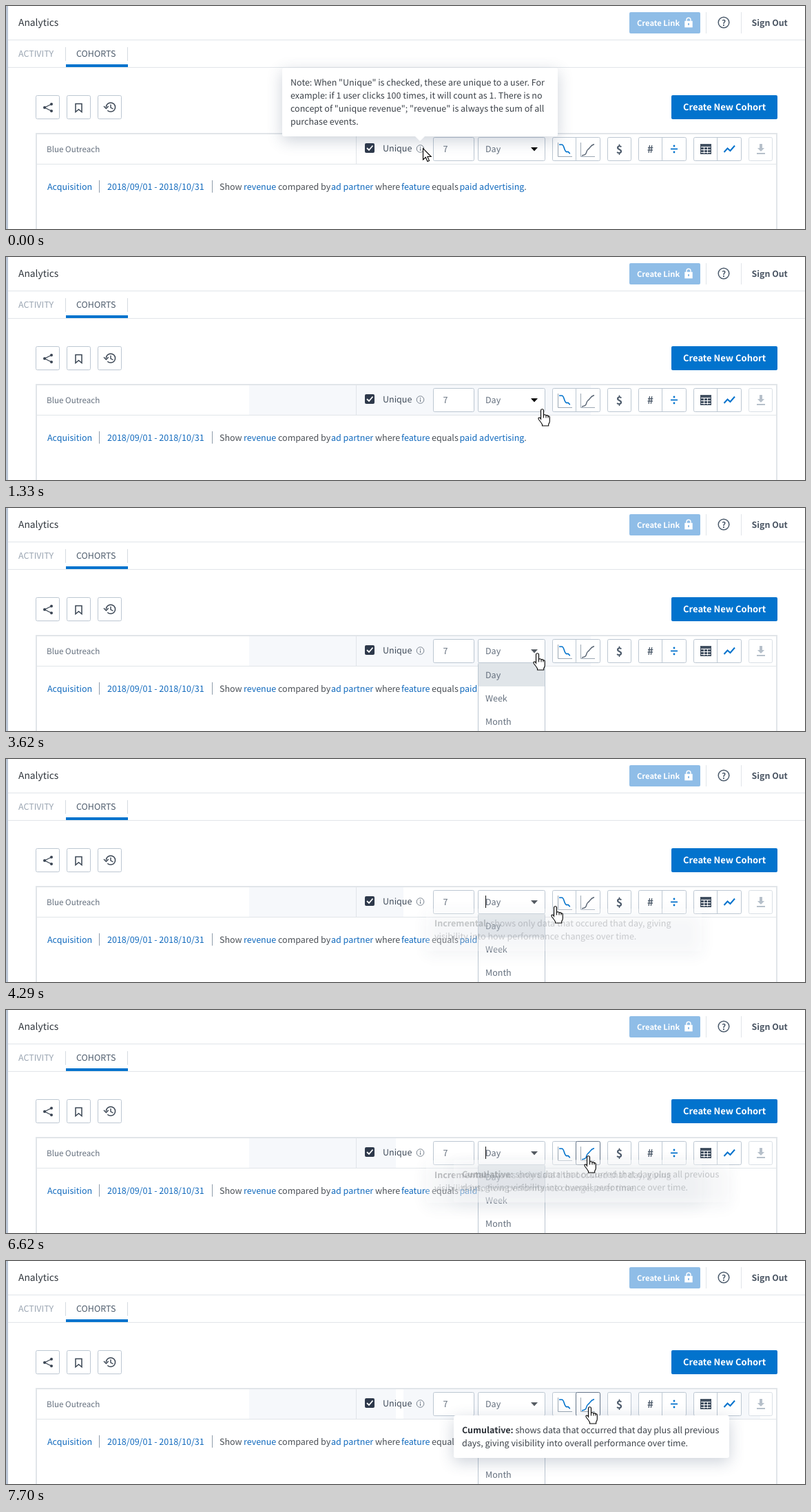
An HTML page with a canvas that plays this animation: 1160x325 px, repeating every 8 s.

```html
<!DOCTYPE html>
<html lang="en">
<head>
<meta charset="utf-8">
<title>Cohorts</title>
<style>
html, body { margin: 0; width: 1160px; height: 325px; overflow: hidden; background: #fff; }
canvas { display: block; }
</style>
</head>
<body>
<canvas id="stage" width="1160" height="325"></canvas>
<script>
const ctx = document.getElementById('stage').getContext('2d');
const LOOP = 8000;
const FACE = '"Noto Sans CJK SC", "Noto Sans CJK JP", "Noto Sans CJK", "Noto Sans", sans-serif';
const BASE = 12.53;
const BLUE = '#0273cd', LINK = '#1069bd', INK = '#3a4553', EDGE = '#bcc7d2', RULE = '#e1e5e9', GREY = '#66717f';

// Each row: start time, then the values held until the next row.
const CURSOR = [
  [0, 605, 207, 'arrow'], [500, 607, 209, 'arrow'], [650, 609, 212, 'arrow'], [800, 590, 246, 'arrow'],
  [950, 789, 262, 'arrow'], [1090, 786, 250, 'arrow'], [1210, 782, 236, 'arrow'], [1330, 778, 222, 'hand'],
  [1450, 775, 215, 'hand'], [1730, 771, 212, 'hand'], [3890, 775, 215, 'hand'], [4015, 781, 217, 'hand'],
  [4140, 788, 216, 'hand'], [4290, 797, 215, 'hand'], [4440, 804, 216, 'hand'], [4590, 808, 216, 'hand'],
  [6200, 812, 215, 'hand'], [6350, 825, 214, 'hand'], [6500, 837, 213, 'hand'], [6620, 845, 213, 'hand'],
  [6740, 847, 213, 'hand']
];
const NOTE = [[0, 1, 0], [500, 0.6, 4], [650, 0.2, 8], [800, 0, 8]];
const STEP_UP = [[0, 0, 0], [4290, 0.25, -7], [4440, 0.78, -2], [4590, 1, 0], [6500, 0.7, -3], [6620, 0.3, -6], [6740, 0.06, -8], [6870, 0, -8]];
const TOTAL = [[0, 0, 0], [6620, 0.27, -7], [6740, 0.72, -2], [6870, 0.95, -1], [7020, 1, 0]];
const CARET = [[0, 0], [2130, 1], [2570, 0], [3040, 1], [3620, 0], [4140, 1], [4590, 0], [5180, 1], [5640, 0], [6200, 1], [6740, 0], [7300, 1], [7700, 0]];
const TINT = [[0], [500, 353, 849], [4290, 353, 577], [4440, 353, 1055], [6500, 353, 566], [6870, 353, 566, 577, 1095]];

const SHAPES = {
  arrow: new Path2D('M0 0V16.5L3.8 13 6.4 19 9 17.9 6.4 12H11.7Z'),
  hand: new Path2D('M-2 1.2a2 2 0 0 1 4 0V8q2.2-1.7 3.6.5 2-1 3.1.9 2.1-.5 2.1 2V17q0 2-1.6 4v2.5H0V21.5Q-2 18-5 14.5-6.5 11.5-4 11.5-3 11.5-2 13.5Z'),
  bookmark: new Path2D('M101 142.5h9v12l-4.5-3.8-4.5 3.8z'),
  lock: new Path2D('M986 22.5h10v8h-10zM988 22.5v-2.2a3 3 0 0 1 6 0v2.2'),
  fall: new Path2D('M803 202h4c4 0 3 12 8 10.5 2-1 2 2 4 2.5'),
  rise: new Path2D('M836 218c9-1 5-6 9-9 4-2.5 3-6 9-7.5')
};

const at = (rows, t) => rows.filter(r => r[0] <= t).pop();

function rect(x, y, w, h, fill) {
  ctx.fillStyle = fill;
  ctx.fillRect(x, y, w, h);
}

function box(x, y, w, h, fill, edge) {
  ctx.beginPath();
  ctx.roundRect(edge ? x + 0.5 : x, edge ? y + 0.5 : y, edge ? w - 1 : w, edge ? h - 1 : h, 2);
  ctx.fillStyle = fill;
  ctx.fill();
  if (edge) {
    ctx.lineWidth = 1;
    ctx.strokeStyle = edge;
    ctx.stroke();
  }
}

function text(str, x, y, color, size = BASE, weight = 400, align = 'left') {
  ctx.font = `${weight} ${size}px ${FACE}`;
  ctx.textAlign = align;
  ctx.fillStyle = color;
  ctx.fillText(str, x, y);
  return x + ctx.measureText(str).width;
}

function line(points, color, width = 1) {
  ctx.beginPath();
  for (let i = 0; i < points.length; i += 2) ctx.lineTo(points[i], points[i + 1]);
  ctx.strokeStyle = color;
  ctx.lineWidth = width;
  ctx.stroke();
}

function curve(path, color, width) {
  ctx.strokeStyle = color;
  ctx.lineWidth = width;
  ctx.stroke(path);
}

function dot(x, y, r, color, stroke) {
  ctx.beginPath();
  ctx.arc(x, y, r, 0, 7);
  if (stroke) {
    ctx.strokeStyle = color;
    ctx.lineWidth = stroke;
    ctx.stroke();
  } else {
    ctx.fillStyle = color;
    ctx.fill();
  }
}

function header() {
  rect(0, 0, 3, 325, '#bac5d5');
  text('Analytics', 18, 29, '#2f353c', 13.8, 500);
  rect(3, 49, 1157, 1, RULE);
  box(905, 9, 103, 31, '#8fbde7');
  text('Create Link', 916, 29, '#fff', 11.2, 700);
  ctx.fillStyle = '#fff';
  ctx.fillRect(986, 22, 10, 8);
  curve(SHAPES.lock, '#fff', 1.4);
  rect(990, 25, 2, 3, '#8fbde7');
  rect(1016, 9, 1, 31, RULE);
  rect(1067, 9, 1, 31, RULE);
  dot(1042, 24, 7.8, '#4c5b6c', 1.5);
  text('?', 1042, 28.5, '#4c5b6c', 12, 700, 'center');
  text('Sign Out', 1082.5, 29, '#4a5563', 12.4, 700);

  text('ACTIVITY', 18, 74, '#9aa5b2', 12.5, 500);
  text('COHORTS', 102, 74, '#4f5d6d', 12.5, 500);
  rect(3, 89, 1157, 1, RULE);
  rect(86, 60, 1, 20, '#d5dae0');
  rect(176, 60, 1, 20, '#d5dae0');
  rect(87, 85, 90, 4, BLUE);
}

function actions() {
  for (const x of [43, 88, 133]) box(x, 130, 35, 35, '#fff', EDGE);
  line([66, 143, 56, 148, 66, 153], INK, 1.3);
  dot(66, 143, 2, INK);
  dot(56, 148, 2, INK);
  dot(66, 153, 2, INK);
  curve(SHAPES.bookmark, INK, 1.5);
  ctx.beginPath();
  ctx.arc(152, 147.5, 6.6, Math.PI, Math.PI * 2.75);
  ctx.strokeStyle = INK;
  ctx.lineWidth = 1.5;
  ctx.stroke();
  line([142, 146, 145.4, 149.5, 148.8, 146], INK, 1.4);
  line([152, 143.5, 152, 148, 155.5, 150], INK, 1.4);
  box(966, 130, 154, 35, BLUE);
  text('Create New Cohort', 983, 152, '#fff', 13, 700);
}

function panel(t) {
  const tint = at(TINT, t);
  for (let i = 1; i < tint.length; i += 2) rect(tint[i], 187, tint[i + 1] - tint[i], 43, '#f6f8fb');
  ctx.strokeStyle = RULE;
  ctx.lineWidth = 2;
  ctx.strokeRect(44, 186, 1075, 160);
  rect(45, 230, 1073, 1, RULE);
  rect(508, 187, 1, 43, RULE);
  text('Blue Outreach', 59, 213, GREY, 11.64);

  box(521, 200, 14, 14, '#2e394b');
  line([524, 207, 527, 210, 532.5, 203.5], '#fff', 1.8);
  text('Unique', 547, 212, '#414c5a');
  dot(601.5, 208, 5.3, '#7b8591', 1);
  rect(601, 205, 1, 1.5, '#66717f');
  rect(601, 207.5, 1, 3.5, '#66717f');

  const plain = '#4a4f55';
  text('Acquisition', 60, 268, LINK);
  rect(135, 254, 1, 18, '#8e9cab');
  text('2018/09/01 - 2018/10/31', 147, 268, LINK);
  rect(299, 254, 1, 18, '#8e9cab');
  text('Show', 310, 268, plain, BASE, 300);
  text('revenue', 345, 268, LINK);
  text('compared by', 395, 268, plain, BASE, 300);
  text('ad partner', 472, 268, LINK);
  text('where', 536, 268, plain, BASE, 300);
  text('feature', 574, 268, LINK);
  text('equals', 618, 268, plain, BASE, 300);
  const end = text('paid advertising', 658.5, 268, LINK);
  text('.', end, 268, plain, BASE, 300);
}

function chartAxes(x) {
  line([x + 0.5, 199, x + 0.5, 219.5, x + 21, 219.5], '#9ba7b4');
}

function tools(t) {
  const over1 = t >= 4440 && t < 6350, over2 = t >= 6500;
  box(620, 191, 60, 35, '#fff', EDGE);
  text('7', 634.5, 213, GREY, BASE, 300);
  box(685, 191, 98, 35, '#fff', EDGE);
  text('Day', 696, 213, GREY, BASE, 300);
  ctx.beginPath();
  ctx.moveTo(762, 206);
  ctx.lineTo(772, 206);
  ctx.lineTo(767, 211.5);
  ctx.fillStyle = t < 2130 ? '#000' : '#555b62';
  ctx.fill();
  if (at(CARET, t)[1]) rect(696, 199, 1, 18, '#111');

  for (const [x, w] of [[793, 70], [873, 35], [918, 70], [998, 70]]) {
    box(x, 191, w, 35, '#fff', EDGE);
    if (w > 35) rect(x + 34, 192, 1, 33, EDGE);
  }
  box(1078, 191, 35, 35, '#fff', '#d9dfe5');
  if (over1) box(793, 191, 35, 35, '#fff', '#66768a');
  if (over2) box(827, 191, 36, 35, '#fff', '#66768a');

  chartAxes(801);
  curve(SHAPES.fall, BLUE, 1.6);
  chartAxes(834);
  curve(SHAPES.rise, over2 ? BLUE : '#5a6675', 1.5);
  text('$', 890.5, 214.5, '#4c5a6a', 16, 700, 'center');
  text('#', 935.5, 214, '#4c5a6a', 15, 700, 'center');
  rect(965, 207.5, 10, 1.8, BLUE);
  dot(970, 204, 1.4, BLUE);
  dot(970, 213, 1.4, BLUE);

  rect(1008, 201, 16, 15, '#435162');
  for (const y of [205, 209, 213]) rect(1009, y, 14, 1, '#fff');
  for (const x of [1013, 1018]) rect(x, 205, 1, 10, '#fff');
  line([1042.5, 213, 1047.5, 207.5, 1051.5, 211, 1058, 203.5], BLUE, 2);

  ctx.beginPath();
  for (const [x, y] of [[1094, 201], [1098, 201], [1098, 207], [1101, 207], [1096, 212], [1091, 207], [1094, 207]]) ctx.lineTo(x, y);
  ctx.fillStyle = '#b6c0ca';
  ctx.fill();
  rect(1090, 214, 12, 2, '#b6c0ca');
}

function menu() {
  box(685, 225, 98, 110, '#fff', EDGE);
  rect(686, 226, 96, 34, '#e0e5e9');
  ['Day', 'Week', 'Month'].forEach((s, i) => text(s, 696, 248 + i * 34, GREY, BASE, 300));
}

function tooltip(rows, t, x, y, h, tipX, tipY, title, lines) {
  const [, alpha, dy] = at(rows, t);
  if (!alpha) return;
  const edge = tipY < y ? y : y + h;
  ctx.save();
  ctx.globalAlpha = alpha;
  ctx.translate(0, dy);
  ctx.save();
  ctx.shadowColor = 'rgba(45,65,100,0.24)';
  ctx.shadowBlur = 22;
  ctx.shadowOffsetY = 6;
  ctx.beginPath();
  ctx.roundRect(x, y, 400, h, 3);
  ctx.fillStyle = '#fff';
  ctx.fill();
  ctx.restore();
  ctx.beginPath();
  ctx.moveTo(tipX - 7, edge);
  ctx.lineTo(tipX, tipY);
  ctx.lineTo(tipX + 7, edge);
  ctx.fillStyle = '#fff';
  ctx.fill();
  lines.forEach((s, i) => {
    const left = x + 12;
    const start = i || !title ? left : text(title, left, y + 26, '#2d3239', BASE, 700);
    text(s, start, y + 26 + i * 19, '#3b4148');
  });
  ctx.restore();
}

function pointer(t) {
  const [, x, y, kind] = at(CURSOR, t);
  ctx.save();
  ctx.translate(x + 0.5, y + 0.5);
  ctx.fillStyle = '#fff';
  ctx.fill(SHAPES[kind]);
  curve(SHAPES[kind], '#000', 1.1);
  if (kind === 'hand') {
    for (const k of [2, 5.5, 8.5]) line([k, 8.5, k, 12], '#000', 1);
  }
  ctx.restore();
}

function draw(t) {
  rect(0, 0, 1160, 325, '#fff');
  header();
  actions();
  panel(t);
  tools(t);
  if (t >= 2130) menu();
  tooltip(NOTE, t, 401, 90, 100, 601, 197, '', [
    'Note: When "Unique" is checked, these are unique to a user. For',
    'example: if 1 user clicks 100 times, it will count as 1. There is no',
    'concept of "unique revenue"; "revenue" is always the sum of all',
    'purchase events.'
  ]);
  tooltip(STEP_UP, t, 610, 225, 62, 810, 218, 'Incremental', [
    ': shows only data that occured that day, giving',
    'visibility into how performance changes over time.'
  ]);
  tooltip(TOTAL, t, 650, 225, 62, 850, 218, 'Cumulative:', [
    ' shows data that occurred that day plus all previous',
    'days, giving visibility into overall performance over time.'
  ]);
  pointer(t);
}

ctx.textRendering = 'geometricPrecision';
const begin = performance.now();
function tick() {
  draw((performance.now() - begin) % LOOP);
  requestAnimationFrame(tick);
}
tick();
</script>
</body>
</html>
```
